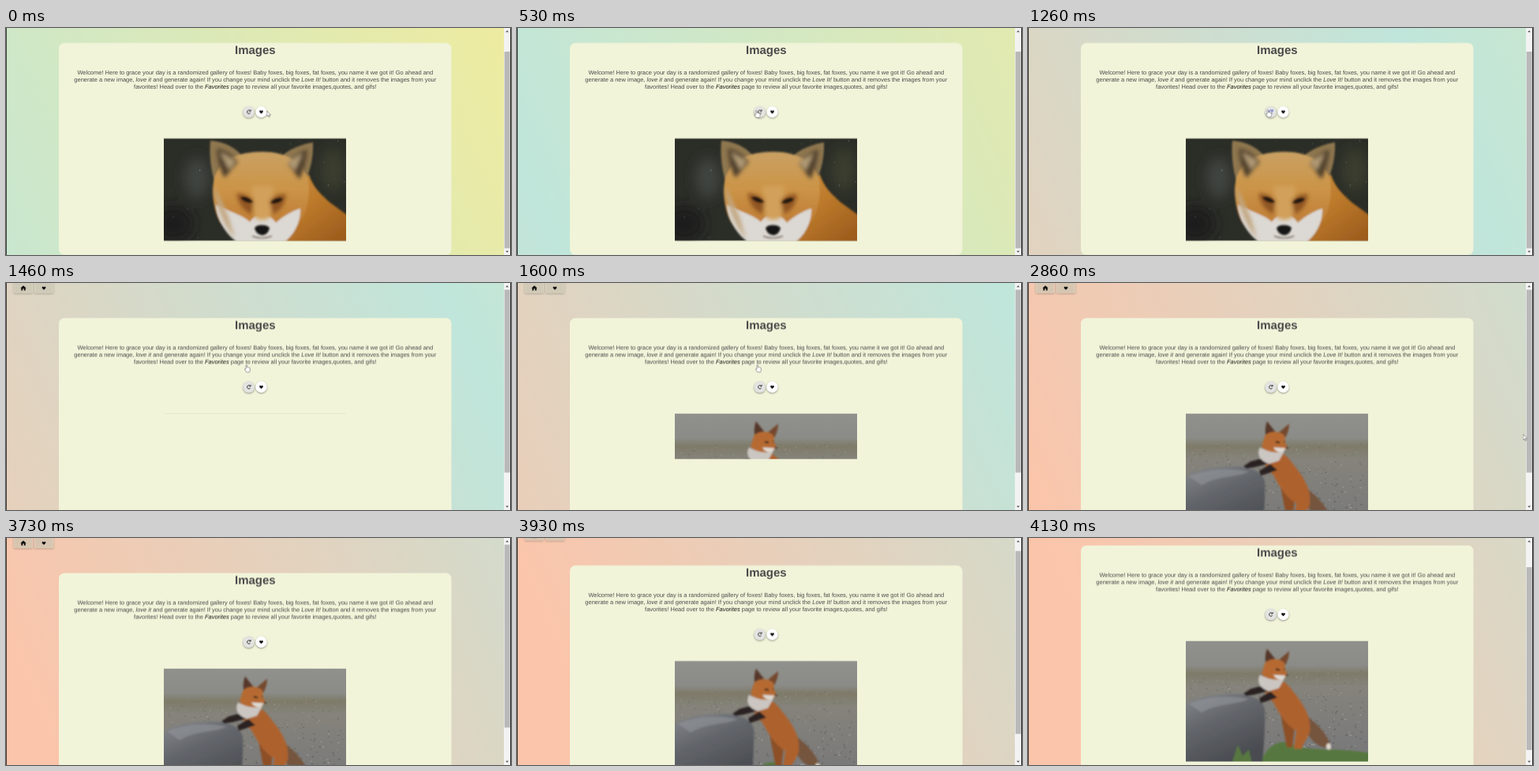
Write an HTML page that moves like this. It is 640 by 288 pixels and loops after 4200 ms.

```html
<!DOCTYPE html>
<html lang="en">
<head>
<meta charset="utf-8">
<title>Images</title>
<style>
html, body { margin: 0; width: 100%; height: 100%; overflow: hidden; }
#stage { position: relative; width: 640px; height: 288px; overflow: hidden; }
#sky {
  position: absolute; left: 0; top: 0; width: 2400px; height: 288px;
  background: linear-gradient(66deg, #fbc5ab 190px, #c0e6db 1150px, #f3ec9a 2110px);
}
svg { position: absolute; left: 0; top: 0; }
text { font-family: "Liberation Sans", Arial, sans-serif; text-anchor: middle; fill: #4a4a4a; text-rendering: geometricPrecision; }
.copy { font-size: 7.49px; }
.copy tspan { font-style: italic; fill: #444; }
.copy .link { fill: #151515; }
.round { filter: drop-shadow(0 1px 1.2px rgba(0,0,0,.38)); }

#sky, #page, #arm, #cover, #thumb { animation: 4200ms linear infinite; }
.cut { animation: 4200ms step-end infinite; }

#sky { animation-name: drift; }
@keyframes drift {
  0% { transform: translateX(-1446px); }
  12.62% { transform: translateX(-1200px); }
  30% { transform: translateX(-655px); }
  38.1% { transform: translateX(-520px); }
  68.1% { transform: translateX(-200px); }
  88.81% { transform: translateX(-150px); }
  98.33%, 100% { transform: translateX(-60px); }
}
#page { animation-name: scroll; }
@keyframes scroll {
  0%, 34.75% { transform: translateY(-25.5px); }
  34.76%, 91.5% { transform: translateY(0); }
  93.5% { transform: translateY(-9px); }
  96.7% { transform: translateY(-32px); }
  98.33%, 100% { transform: translateY(-35px); }
}
#thumb { animation-name: thumb; }
@keyframes thumb {
  0%, 34.75% { y: 30px; height: 249.5px; }
  34.76%, 91.5% { y: 8.5px; height: 232px; }
  93.5% { y: 16px; height: 232px; }
  96.7% { y: 34.5px; height: 232px; }
  98.33%, 100% { y: 37px; height: 232px; }
}
#before { animation-name: before; }
@keyframes before { 0% { opacity: 1; } 34.76%, 100% { opacity: 0; } }
#after { animation-name: after; }
@keyframes after { 0% { opacity: 0; } 34.76%, 100% { opacity: 1; } }
#cover { animation-name: load; }
@keyframes load {
  0%, 34.76% { transform: translateY(0); opacity: 1; }
  43.6% { transform: translateY(153px); opacity: 1; }
  43.7%, 100% { transform: translateY(153px); opacity: 0; }
}
#reload { animation-name: press; }
@keyframes press { 0% { stroke: #222; } 26.9% { stroke: #3c45c4; } 34.76%, 100% { stroke: #222; } }
#arm { animation-name: point; }
@keyframes point {
  0%, 1.43% { transform: translate(330.5px, 105px); }
  10.5% { transform: translate(304px, 104px); }
  12.62% { transform: translate(302.6px, 104px); }
  30% { transform: translate(303.2px, 103.3px); }
  34.76%, 47.6% { transform: translate(304px, 103.3px); }
  66% { transform: translate(627px, 191px); }
  68.1%, 100% { transform: translate(627.5px, 192px); }
}
#arrow { animation-name: arrow; }
@keyframes arrow { 0% { opacity: 1; } 2.6% { opacity: 0; } 49.2% { opacity: 1; } 72.86%, 100% { opacity: 0; } }
#hand { animation-name: hand; }
@keyframes hand { 0% { opacity: 0; } 2.6% { opacity: 1; } 49.2%, 100% { opacity: 0; } }
</style>
</head>
<body>
<div id="stage">
<div id="sky"></div>
<svg width="640" height="288" viewBox="0 0 640 288">
  <defs>
    <filter id="soft" x="-5%" y="-5%" width="110%" height="110%"><feGaussianBlur stdDeviation=".8"/></filter>
    <filter id="fuzz" x="-50%" y="-50%" width="200%" height="200%"><feGaussianBlur stdDeviation="2.5"/></filter>
    <filter id="haze" x="-50%" y="-50%" width="200%" height="200%"><feGaussianBlur stdDeviation="8"/></filter>
    <clipPath id="wide"><rect width="231" height="130"/></clipPath>
    <clipPath id="tall"><rect width="231" height="153"/></clipPath>
    <linearGradient id="face" x2="0" y2="1"><stop stop-color="#c9a164"/><stop offset=".4" stop-color="#cc9548"/><stop offset="1" stop-color="#b8702a"/></linearGradient>
    <linearGradient id="coat" x2="1" y2="1"><stop stop-color="#d09a4c"/><stop offset=".5" stop-color="#bd7a2b"/><stop offset="1" stop-color="#95561a"/></linearGradient>
    <linearGradient id="road" x2="0" y2="1"><stop stop-color="#90918c"/><stop offset=".2" stop-color="#8b8c88"/><stop offset=".27" stop-color="#7f7b69"/><stop offset=".38" stop-color="#85837b"/><stop offset="1" stop-color="#77777a"/></linearGradient>
    <linearGradient id="stone" x2=".5" y2="1"><stop stop-color="#86898d"/><stop offset=".45" stop-color="#63666b"/><stop offset="1" stop-color="#494c51"/></linearGradient>
    <path id="heart" d="M0 2.3L-2.1 .2C-3.2-1.2-1.3-2.9 0-1.2C1.3-2.9 3.2-1.2 2.1 .2Z" fill="#111"/>
  </defs>

  <g id="page">
    <g class="round" fill="#e9e6d0" fill-opacity=".55">
      <rect x="9.5" y="-6" width="24.5" height="19" rx="2"/>
      <rect x="36" y="-6" width="24.5" height="19" rx="2"/>
    </g>
    <path d="M18.3 6.5L22 3.2L25.7 6.5H24.7V9.5H22.8V7.3H21.2V9.5H19.3V6.5Z" fill="#111"/>
    <use href="#heart" x="48" y="6.5"/>

    <g id="before" class="cut">
      <rect x="67" y="44.5" width="497.5" height="269" rx="7" fill="#f1f4d9"/>
      <g transform="translate(200 165.5)" clip-path="url(#wide)">
        <rect width="231" height="130" fill="#2b2d27"/>
        <g filter="url(#haze)">
          <ellipse cx="42" cy="50" rx="16" ry="26" fill="#41453f"/>
          <ellipse cx="214" cy="40" rx="16" ry="28" fill="#3a3d2d"/>
          <ellipse cx="12" cy="108" rx="25" ry="22" fill="#1d1f1d"/>
        </g>
        <g id="snow" fill="#d5d8d8"></g>
        <g filter="url(#soft)">
          <path d="M160 45L184 46C189 62 199 71 210 81L236 100V136H110Z" fill="url(#coat)"/>
          <path d="M59 3C57 25 61 44 65 58L106 30C92 11 76 4 59 3Z" fill="#8f7750"/>
          <path d="M189 5C167 9 152 18 144 28L176 64C184 45 190 26 189 5Z" fill="#8f7750"/>
          <path d="M64 50C72 28 92 17 125 17C155 17 174 29 182 50C186 66 183 87 176 100C163 122 141 132 125 132C105 132 82 124 71 106C63 92 60 66 64 50Z" fill="url(#face)"/>
          <path d="M66 84C82 93 100 97 109 106C114 99 119 97 125 97C132 97 137 100 142 107C152 98 163 92 173 89C174 106 165 124 150 134H96C82 125 67 106 66 84Z" fill="#dcd8d3"/>
        </g>
        <g filter="url(#fuzz)">
          <path d="M67 13C68 28 71 40 77 50L94 30C86 20 78 14 67 13Z" fill="#53432e"/>
          <path d="M182 14C170 18 162 24 157 32L172 52C178 39 181 27 182 14Z" fill="#53432e"/>
          <path d="M71 17L91 29L83 40ZM176 19L157 30L166 41Z" fill="#b09a75"/>
          <path d="M111 60H139L135 100Q125 107 115 100Z" fill="#d2a05a"/>
          <path d="M92 70Q104 69 114 79L111 96Q96 90 92 70Z" fill="#8f5420"/>
          <path d="M155 71Q144 69 134 79L138 96Q153 90 155 71Z" fill="#8f5420"/>
          <path d="M64 60Q66 96 90 127L82 100Z" fill="#c2a883"/>
        </g>
        <g filter="url(#soft)">
          <path d="M97 75Q105 72 113 81Q103 83 97 75Z" fill="#23180f"/>
          <path d="M151 77Q143 73 135 82Q145 84 151 77Z" fill="#23180f"/>
          <path d="M115 114Q117 110 124 110Q132 110 134 114Q132 122 125 123Q117 122 115 114Z" fill="#191513"/>
          <path d="M112 124Q124 129 137 124" fill="none" stroke="#5a4c42" stroke-width="1.2"/>
        </g>
      </g>
    </g>

    <g id="after" class="cut">
      <rect x="67" y="44.5" width="497.5" height="292" rx="7" fill="#f1f4d9"/>
      <g transform="translate(200 165.5)">
        <g clip-path="url(#tall)">
          <rect width="231" height="153" fill="url(#road)"/>
          <g id="gravel"></g>
          <g filter="url(#soft)">
            <path d="M94 156C100 138 115 124 131 130C155 142 190 134 236 143V156Z" fill="#56783f"/>
            <path d="M-3 83C10 72 30 69 50 68C72 65 96 70 100 86C101 106 99 130 97 156H-3Z" fill="url(#stone)"/>
            <path d="M4 80C22 71 58 68 80 74C62 82 42 78 20 91Z" fill="#92959a" opacity=".6"/>
            <path d="M58 156L66 132L72 146L80 138L84 156Z" fill="#587740"/>
            <path d="M148 92C165 102 179 118 184 134C174 138 162 132 152 114Z" fill="#75553e"/>
            <ellipse cx="181" cy="134" rx="3" ry="4" fill="#ddd7ca"/>
            <path d="M120 92L128 135H135L138 108Z" fill="#8d4f28"/>
            <path d="M101 46C114 43 128 52 135 63C149 80 160 97 157 116C153 126 148 131 147 137H137L140 114C128 108 118 92 111 78C100 69 96 57 101 46Z" fill="#ad622f"/>
            <path d="M100 56L82 61L73 67L77 70L88 68L107 63Z" fill="#2a2421"/>
            <path d="M107 64L93 73L95 79L101 77L116 72Z" fill="#2a2421"/>
            <path d="M94 43C100 48 118 49 126 46L118 60L105 64C94 60 89 52 94 43Z" fill="#cbc6c1"/>
            <path d="M103 10L114 24L102 32Q99 19 103 10Z" fill="#57382a"/>
            <path d="M131 13L118 24L126 31Q131 22 131 13Z" fill="#74482f"/>
            <path d="M100 29C104 22 119 21 125 28L126 37L129 43L124 48C112 51 100 48 96 42Z" fill="#b66a33"/>
            <path d="M111 43L127 44L123 49Q114 50 111 43Z" fill="#ded9d3"/>
            <path d="M114 36L119 37M124 36L125 36M127 43L129 44" stroke="#1e1814" stroke-width="2"/>
          </g>
        </g>
        <rect id="cover" x="-1" y="-.5" width="233" height="154" fill="#f1f4d9"/>
      </g>
    </g>

    <text x="315.8" y="58.6" font-size="14.99" font-weight="bold">Images</text>
    <g class="copy">
      <text x="315.8" y="84.4">Welcome! Here to grace your day is a randomized gallery of foxes! Baby foxes, big foxes, fat foxes, you name it we got it! Go ahead and</text>
      <text x="315.8" y="93.4">generate a new image, <tspan>love it</tspan> and generate again! If you change your mind unclick the <tspan>Love It!</tspan> button and it removes the images from your</text>
      <text x="315.8" y="102.4">favorites! Head over to the <tspan class="link">Favorites</tspan> page to review all your favorite images,quotes, and gifs!</text>
    </g>

    <circle class="round" cx="307.7" cy="132" r="7.3" fill="#e3e3e1"/>
    <circle class="round" cx="323.5" cy="132" r="7.2" fill="#fff"/>
    <path id="reload" class="cut" d="M309.6 133.3A2.2 2.2 0 1 1 309.4 130.5M310.1 129.1V131H308.2" fill="none" stroke="#222" stroke-width=".9"/>
    <use href="#heart" x="323.5" y="132"/>
  </g>

  <rect x="631" width="8.3" height="288" fill="#f3f3f3"/>
  <rect id="thumb" x="631.7" width="7" y="30" height="249.5" fill="#b9b9b9"/>
  <path d="M633.2 5.3L635.1 3L637 5.3ZM633.2 282.7L635.1 285L637 282.7Z" fill="#555"/>
  <path d="M0 0H.7V288H0ZM639.2 0H640V288H639.2Z" fill="#000"/>

  <g id="arm" fill="#fff" stroke="#444" stroke-width=".5" stroke-linejoin="round">
    <path id="arrow" class="cut" d="M0 0V7.2L1.7 5.7L2.8 8.2L3.9 7.7L2.8 5.3H5Z"/>
    <path id="hand" class="cut" d="M0 .8Q.7-.3 1.4 .8V3.7Q2.3 3 2.8 3.9Q3.7 3.4 4.1 4.3Q5.3 4 5.4 5.2V7.3L4.6 9.8H.7L-1.5 6.4Q-1.6 5.2 0 6Z"/>
  </g>
</svg>
</div>
<script>
let seed = 7;
const rnd = () => (seed = seed * 16807 % 2147483647) / 2147483647;
function dot(parent, x, y, r, look) {
  const c = document.createElementNS("http://www.w3.org/2000/svg", "ellipse");
  const all = { cx: x, cy: y, rx: r, ry: r * .75, ...look };
  for (const k in all) c.setAttribute(k, all[k]);
  parent.append(c);
}
const snow = document.getElementById("snow");
for (let i = 0; i < 60; i++)
  dot(snow, rnd() * 230, rnd() * 130, .3 + rnd() * .5, { opacity: .2 + rnd() * .5 });
const gravel = document.getElementById("gravel");
for (let i = 0; i < 420; i++) {
  const y = 38 + rnd() * 112;
  dot(gravel, rnd() * 230, y, .5 + y / 110 * rnd(), { fill: rnd() < .5 ? "#b3b2af" : "#53524f", opacity: .45 });
}
</script>
</body>
</html>
```
